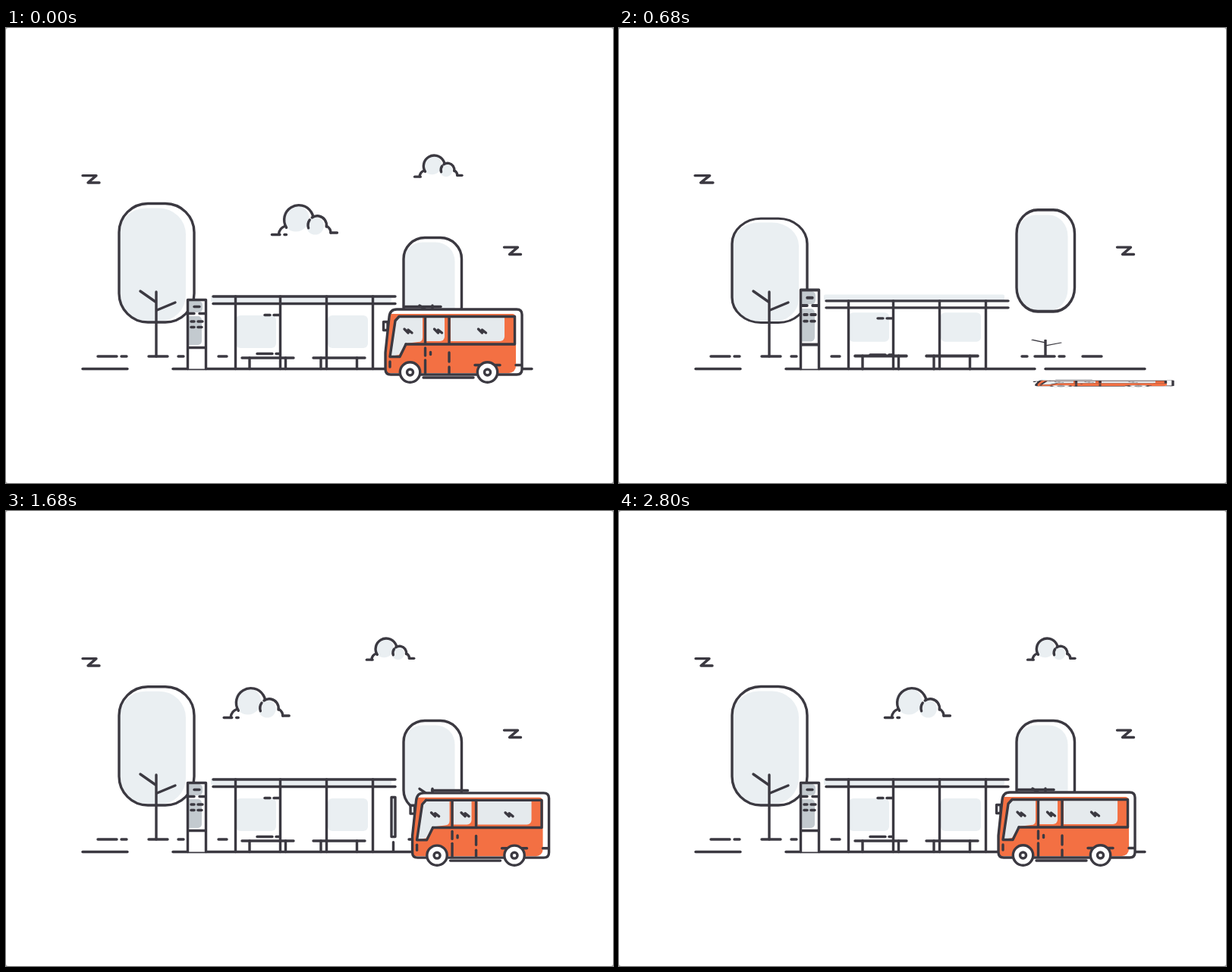
An HTML page with a canvas that plays this animation: 800x600 px, repeating every 2840 ms.

```html
<!DOCTYPE html>
<html lang="en">
<head>
<meta charset="utf-8">
<title>Bus stop</title>
<style>
  html, body { margin: 0; width: 100%; height: 100%; overflow: hidden; background: #fff; }
  canvas { display: block; width: 800px; height: 600px; }
</style>
</head>
<body>
<canvas id="stage" width="800" height="600"></canvas>
<script>
const ctx = document.getElementById('stage').getContext('2d');
const LOOP = 2840, STEP = 40;
const INK = '#3b3941', PALE = '#eaeff2', STEEL = '#c3cacf', ORANGE = '#f37043', GLASS = '#e5eaed';
const WEIGHT = 3.4;
let now = 0;

// Easing: each takes a start time in ms and reads the current time.
const elastic = (start, period = 480, damping = 0.00433) => {
  const t = now - start;
  return t <= 0 ? 0 : 1 - Math.exp(-damping * t) * Math.cos(2 * Math.PI * t / period);
};
const back = (start, duration, pull = 1.7) => {
  const u = Math.min(1, (now - start) / duration) - 1;
  return u <= -1 ? 0 : 1 + (pull + 1) * u ** 3 + pull * u * u;
};
const driveLeft = () => {
  const u = Math.min(1, Math.max(0, (now - 1030) / 1800));
  return (1 + Math.cos(Math.PI * u)) / 2;
};

// Drawing helpers
function scaled(x, y, sx, sy, draw) {
  if (Math.abs(sx) < 0.004 || Math.abs(sy) < 0.004) return;
  ctx.save();
  ctx.translate(x, y);
  ctx.scale(sx, sy);
  ctx.translate(-x, -y);
  draw();
  ctx.restore();
}
const stretchY = (y, s, draw) => scaled(0, y, 1, s, draw);

function line(...pts) {
  ctx.beginPath();
  for (let i = 0; i < pts.length; i += 2) ctx.lineTo(pts[i], pts[i + 1]);
  ctx.stroke();
}
// Horizontal strokes on one level, given as pairs of ends.
function row(y, ...ends) {
  for (let i = 0; i < ends.length; i += 2) line(ends[i], y, ends[i + 1], y);
}
function box(left, top, right, bottom, radius, fill, outline) {
  ctx.beginPath();
  ctx.roundRect(left, top, right - left, bottom - top, radius);
  if (fill) { ctx.fillStyle = fill; ctx.fill(); }
  if (outline) ctx.stroke();
}
function disc(x, y, r, fill, outline) {
  ctx.beginPath();
  ctx.arc(x, y, r, 0, 7);
  ctx.fillStyle = fill;
  ctx.fill();
  if (outline) ctx.stroke();
}
function arc(x, y, r, from, to) {
  ctx.beginPath();
  ctx.arc(x, y, r, from * Math.PI / 180, to * Math.PI / 180);
  ctx.stroke();
}

function crown(left, top, right, bottom, radius, inset) {
  box(left, top + 6, right - inset, bottom - 1, radius - 3, PALE);
  box(left, top, right, bottom, radius, null, true);
}

function trees() {
  stretchY(392, elastic(197), () => crown(149, 231.5, 248, 388, 38, 11));
  const s = elastic(360, 640, 0.0066);
  ctx.save();
  ctx.translate(0, 164 * s * (1 - s));
  stretchY(396, s, () => crown(524, 276.5, 600.5, 396, 28, 9));
  ctx.restore();

  stretchY(433, back(123, 430), () => {
    line(198, 348, 198, 433);
    line(177, 347, 197, 361);
    line(199, 372, 223, 362);
    row(433, 188, 213);
  });
  stretchY(433, elastic(634), () => {
    line(562, 366, 562, 433);
    line(545, 366, 561, 377);
    line(563, 389, 582, 378);
    row(433, 549, 574);
  });
}

function ground() {
  stretchY(433, back(40, 350), () =>
    row(433, 121, 146, 152, 159, 227, 234, 280, 291, 531, 538, 548, 574, 580, 587, 611, 636));
  scaled(397, 449.5, back(134, 430), 1, () => row(449.5, 101, 160, 220, 548, 562, 693));
}

function shelter() {
  stretchY(343, elastic(174), () => {
    box(270, 352.5, 508, 361.5, 2, PALE);
    box(303, 379, 356, 422, 6, PALE);
    box(424, 379, 477, 422, 6, PALE);
  });
  stretchY(450, elastic(134), () => {
    row(354, 273, 513);
    row(363.5, 273, 513);
    for (const x of [302.5, 361.5, 422.5, 483.5]) line(x, 354, x, 449.5);
    row(378.5, 341, 348, 353, 360);
    row(429.5, 331, 351, 356, 361);
  });
  stretchY(450, back(410, 500, 2.35), () => {
    for (const x of [311, 405]) {
      row(435, x, x + 68);
      line(x + 10, 435, x + 10, 449.5);
      line(x + 57.5, 435, x + 57.5, 449.5);
    }
  });
}

function machine() {
  stretchY(450, back(410, 500, 2.1), () => {
    box(239.5, 358.5, 263.5, 449.5, 0, '#fff');
    box(241, 360, 259, 375, [0, 5, 5, 0], STEEL);
    box(241, 380, 258, 418, [0, 5, 5, 0], STEEL);
    line(239.5, 449.5, 239.5, 358.5, 263.5, 358.5, 263.5, 449.5);
    row(421.5, 240, 263);
    row(376.5, 240, 248, 255, 262);
    row(367.5, 248, 255);
    row(387, 244, 248, 253, 259);
    row(394.5, 244, 248, 253, 258);
  });
}

function sign() {
  stretchY(449, elastic(890), () => {
    box(508, 379, 513, 430, 0, PALE, true);
    line(510.5, 437, 510.5, 449);
  });
}

function busBody() {
  ctx.beginPath();
  ctx.moveTo(515, 371);
  ctx.lineTo(673, 371);
  ctx.quadraticCurveTo(680, 371, 680, 378);
  ctx.lineTo(680, 450);
  ctx.quadraticCurveTo(680, 457, 673, 457);
  ctx.lineTo(507, 457);
  ctx.quadraticCurveTo(500, 457, 500, 450);
  ctx.lineTo(500, 428);
  ctx.lineTo(505, 381);
  ctx.quadraticCurveTo(506, 371, 515, 371);
  ctx.closePath();
}

function bus() {
  box(497.5, 387.5, 503, 398.5, 0, '#fff', true);
  row(367.5, 526, 573);

  busBody();
  ctx.fillStyle = '#fff';
  ctx.fill();
  ctx.save();
  busBody();
  ctx.clip();
  box(499, 377, 672, 455, [9, 5, 9, 0], ORANGE);
  ctx.restore();

  // Glass, leaving an orange edge on the right of each pane.
  ctx.beginPath();
  ctx.moveTo(515, 381);
  ctx.lineTo(549, 381);
  ctx.lineTo(549, 408);
  ctx.quadraticCurveTo(549, 414, 543, 414);
  ctx.lineTo(527, 416);
  ctx.lineTo(518, 431);
  ctx.lineTo(507, 433);
  ctx.closePath();
  ctx.fillStyle = GLASS;
  ctx.fill();
  box(554, 381, 578, 413, [0, 0, 6, 0], GLASS);
  box(586, 381, 657, 413, [0, 0, 6, 0], GLASS);

  busBody();
  ctx.stroke();
  line(527, 417, 670.5, 417, 670.5, 380.5, 518, 380.5);
  line(518, 380.5, 513, 386, 506, 433.5, 519, 433.5, 527, 417);
  line(552.5, 381, 552.5, 416);
  line(584, 381, 584, 416);
  for (const x of [525, 564.5, 622.5]) line(x, 397, x + 5, 402, x + 5, 398, x + 10, 402);

  line(552.5, 422, 552.5, 432);
  line(552.5, 438, 552.5, 456);
  line(559.5, 427.5, 559.5, 430.5);
  line(584, 428, 584, 440);
  line(584, 447, 584, 456);
  line(506, 440, 506, 447);
  row(444.5, 618, 651, 672, 679);
  row(461, 550, 616);

  for (const x of [532.5, 634.5]) {
    disc(x, 454, 13.2, '#fff', true);
    disc(x, 454, 4, '#fff', true);
  }
}

function cloud(x, y, size, start, hasDot) {
  const pop = back(start, 500, 2.5) * size;
  ctx.save();
  ctx.translate(x - 89 * driveLeft(), y);
  scaled(0, 0, pop, pop, () => {
    ctx.lineWidth = WEIGHT / size;
    disc(-11, -2, 17.5, PALE);
    disc(14.5, 8, 11.5, PALE);
    arc(-7, 0, 19.3, 148, 345);
    arc(17.3, 7, 12.2, 162, 215);
    arc(17.3, 7, 12.2, 235, 370);
    arc(-21, 20, 12.5, 185, 250);
    row(19.5, -42.5, -32);
    if (hasDot) row(19.5, -26, -23.5);
    arc(25, 17, 10, 305, 360);
    row(17, 35, 43.5);
  });
  ctx.restore();
}

function bird(x, y, start, duration) {
  scaled(x, y, back(start, duration, 1.9), 1, () =>
    line(x - 11, y - 4.7, x + 7, y - 4.7, x - 4, y + 4.7, x + 11, y + 4.7));
}

function render() {
  ctx.fillStyle = '#aaa';
  ctx.fillRect(0, 0, 800, 600);
  box(0, 0, 800, 600, 3, '#fff');
  ctx.strokeStyle = INK;
  ctx.lineWidth = WEIGHT;
  ctx.lineCap = ctx.lineJoin = 'round';

  trees();
  ground();
  machine();
  shelter();
  sign();
  ctx.save();
  ctx.translate(50 * driveLeft(), 0);
  stretchY(474, elastic(663), bus);
  ctx.restore();
  cloud(393, 253, 1, 980, true);
  cloud(569.5, 182, 0.725, 1140, false);
  bird(112, 199.3, 380, 400);
  bird(667.5, 293.8, 196, 400);
}

const began = performance.now();
function tick() {
  const t = Math.max(0, performance.now() - began) % LOOP;
  // The loop opens on the finished scene for one step, then clears.
  now = Math.floor(t / STEP) * STEP || LOOP - STEP;
  render();
  requestAnimationFrame(tick);
}
tick();
</script>
</body>
</html>
```
